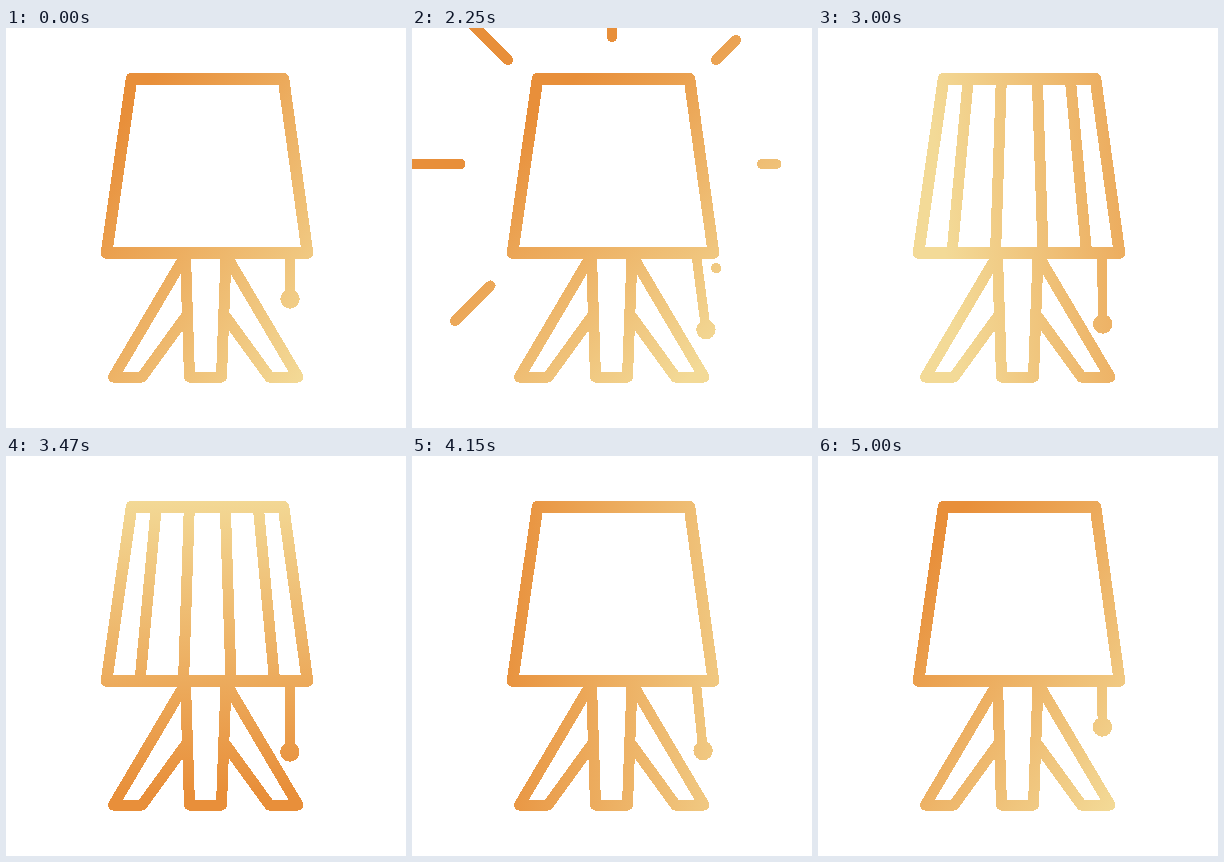
Recreate the animation shown at these times as an HTML page. Size 400 by 400 pixels, loop 5020 ms.

```html
<!DOCTYPE html>
<html lang="en">
<head>
<meta charset="utf-8">
<title>Table lamp</title>
<style>
  html, body { margin: 0; width: 100%; height: 100%; overflow: hidden; background: #fff; }
  svg { display: block; width: 100%; height: 100%; }
</style>
</head>
<body>
<svg viewBox="0 0 400 400" fill="none" stroke="url(#glow)" stroke-linejoin="round" shape-rendering="crispEdges">
  <defs>
    <linearGradient id="glow" gradientUnits="userSpaceOnUse">
      <stop offset="0" stop-color="#e88f3a"/>
      <stop offset="1" stop-color="#f3da97"/>
    </linearGradient>
  </defs>
  <g id="rays" stroke-width="10" stroke-linecap="round"></g>
  <g id="stripes" stroke-width="11"></g>
  <path d="M125.500 51H277.500L301.500 225H100.500Z" stroke-width="11.6"/>
  <g stroke-width="11">
    <path d="M179 228L107.500 349H136L181 287"/>
    <path d="M220.500 228L292 349H263.500L218.500 287"/>
    <path d="M179.500 228L183.500 349H215.500L220 228"/>
  </g>
  <path id="cord" stroke-width="9.6"/>
  <circle id="bob" r="9.7" fill="url(#glow)" stroke="none"/>
</svg>
<script>
const LOOP = 5020;
const RAY_LENGTH = 75;
const RAY_REACH = [127, 147, 150, 147];   // from the top ray outwards
const STRIPES = [-51, -18, 18, 51];       // offsets from the middle of the shade

const $ = id => document.getElementById(id);
const glow = $('glow'), cord = $('cord'), bob = $('bob');
const rad = deg => deg * Math.PI / 180;
const ramp = (t, from, time) => Math.max(0, Math.min(1, (t - from) / time));
const smooth = u => u * u * (3 - 2 * u);
const easeOut = (u, power) => 1 - (1 - u) ** power;

function set(el, attrs) {
  for (const name in attrs) el.setAttribute(name, attrs[name]);
}

function addPaths(group, count) {
  return Array.from({ length: count }, () => $(group).appendChild(
    document.createElementNS('http://www.w3.org/2000/svg', 'path')));
}

const rays = addPaths('rays', 7);
const stripes = addPaths('stripes', STRIPES.length);

// draws the part of a line between tail and head
function trim(path, at, tail, head) {
  set(path, { d: tail < head ? `M${at(tail)}L${at(head)}` : '' });
}

// one full turn, drifting right while the light end points left
function drawGlow(t) {
  const turn = smooth(easeOut(ramp(t, 2000, 3000), 1.35));
  const a = rad(36 + 360 * turn);
  const x = 252 - 22 * Math.cos(a), y = 185;
  const dx = 150 * Math.cos(a), dy = 150 * Math.sin(a);
  set(glow, { x1: x - dx, y1: y - dy, x2: x + dx, y2: y + dy });
}

function swing(t, from) {
  const e = Math.max(0, t - from);
  return 14 * Math.exp(-e / 300) * Math.sin(Math.PI * e / 400);
}

function drawCord(t) {
  const length = 46
    + 34 * easeOut(ramp(t, 2005, 105), 2)
    - 9 * smooth(ramp(t, 2110, 390))
    - 25 * smooth(ramp(t, 4110, 340));
  const a = rad(swing(t, 2060) + swing(t, 4080));
  const x = 284 + Math.sin(a) * length, y = 225 + Math.cos(a) * length;
  set(cord, { d: `M284 225L${x} ${y}` });
  set(bob, { cx: x, cy: y });
}

// clockwise burst, starting at the lower left
function drawRays(t) {
  rays.forEach((path, i) => {
    const a = rad(135 + 45 * i), reach = RAY_REACH[Math.abs(i - 3)];
    const from = 2040 + 35 * i;
    const at = r => `${200 + (reach + r) * Math.cos(a)} ${136 + (reach + r) * Math.sin(a)}`;
    trim(path, at, RAY_LENGTH * ramp(t, from + 165, 80) ** 2, RAY_LENGTH * ramp(t, from, 188));
  });
}

function drawStripes(t) {
  stripes.forEach((path, i) => {
    const at = u => `${201.3 + STRIPES[i] * (1 + 0.32 * u)} ${51 + 174 * u}`;
    trim(path, at, smooth(ramp(t, 3650 + 20 * i, 150)), smooth(ramp(t, 2270 + 45 * i, 200)));
  });
}

const start = performance.now();
function tick() {
  const t = (performance.now() - start) % LOOP;
  [drawGlow, drawCord, drawRays, drawStripes].forEach(draw => draw(t));
  requestAnimationFrame(tick);
}
tick();
</script>
</body>
</html>
```
